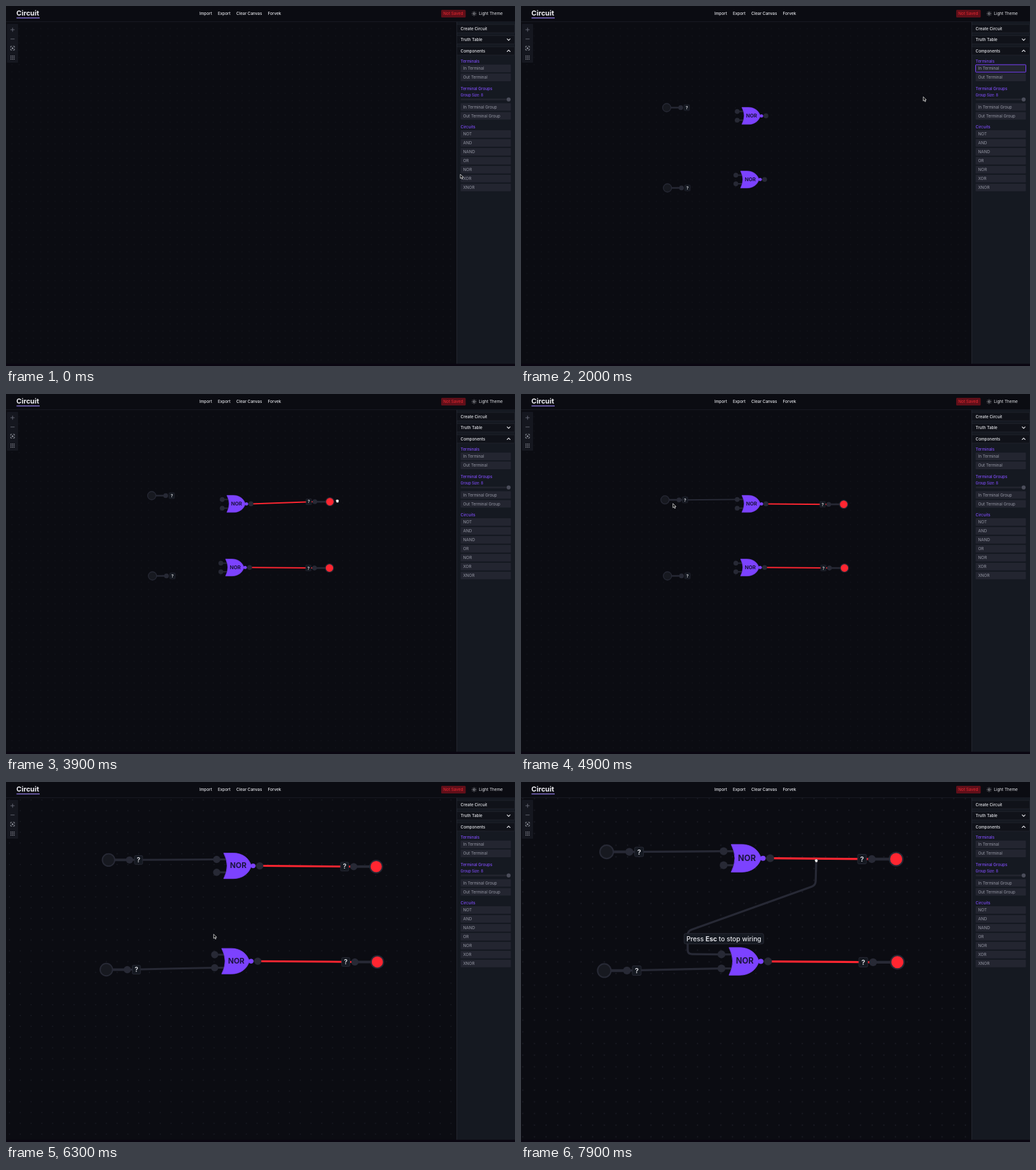
These frames come from a looping animation (800x565 px, 8 s). An HTML page:

```html
<!DOCTYPE html>
<html lang="en">
<head>
<meta charset="utf-8">
<title>Circuit</title>
<style>
  html, body { margin: 0; width: 100%; height: 100%; overflow: hidden; background: #0b0c12; }
  svg { display: block; width: 100vw; height: 100vh; font-family: Inter, "Liberation Sans", sans-serif; font-size: 6.35px; }
</style>
</head>
<body>
<svg viewBox="0 0 800 565" xmlns="http://www.w3.org/2000/svg">
  <defs>
    <pattern id="dots" x="-7.6" y="29.8" width="11.3" height="11.3" patternUnits="userSpaceOnUse">
      <circle cx="5.65" cy="5.65" r=".55" fill="#20212b"/>
    </pattern>
  </defs>
  <rect width="800" height="565" fill="#0b0c12"/>
  <g id="world">
    <rect x="-100" y="-100" width="1000" height="900" fill="url(#dots)"/>
    <g id="circuit"></g>
  </g>
  <g id="ui"></g>
  <g id="focus"></g>
  <g id="cursor"></g>
</svg>
<script>
const LOOP = 8000, STEP = 100;
const PURPLE = '#7c42ff', RED = '#ff2631', GREY = '#272935', PANEL = '#151921';
const WHITE = '#e6e7ec', EDGE = '#292b36';
const $ = id => document.getElementById(id);

// --- drawing helpers ---
const rect = (x, y, w, h, fill, extra = '') =>
  `<rect x="${x}" y="${y}" width="${w}" height="${h}" fill="${fill}" ${extra}/>`;
const circle = (x, y, r, fill, extra = '') =>
  `<circle cx="${x}" cy="${y}" r="${r}" fill="${fill}" ${extra}/>`;
const text = (x, y, s, fill, extra = '') =>
  `<text x="${x}" y="${y}" fill="${fill}" ${extra}>${s}</text>`;
const stroke = (d, color, width, extra = '') =>
  `<path d="${d}" fill="none" stroke="${color}" stroke-width="${width}" stroke-linecap="round" stroke-linejoin="round" ${extra}/>`;

// --- fixed interface ---
const ROW = 14;
const circuitRow = i => 200.9 + ROW * i;
const itemBox = cy => [714.5, cy - 5.9, 79, 11.8];
const item = (cy, label) => rect(...itemBox(cy), '#232530', 'rx="1"') + text(718.5, cy + 2.3, label, '#9698a5');
const heading = (y, label) => text(714.5, y, label, '#7d4bf4', 'font-weight="500"');
const sideRow = (i, label) =>
  rect(708.5, 29 + 17.5 * i, 91, 13, '#101219', 'stroke="#23252f" stroke-width=".7"') +
  text(714.5, 37.8 + 17.5 * i, label, WHITE, 'font-weight="500"');

function drawHeader() {
  let s = rect(0, 0, 800, 24.5, '#0b0c12') + rect(0, 24.3, 800, .8, '#1d1f28');
  s += text(16.3, 14.7, 'Circuit', '#f1f1f5', 'font-size="11" font-weight="700"');
  s += rect(16.5, 18, 36.5, 1.4, '#8470d2');
  s += text(304, 14.2, 'Import', WHITE, 'font-weight="500"') + text(333, 14.2, 'Export', WHITE, 'font-weight="500"');
  s += text(362, 14.2, 'Clear Canvas', WHITE, 'font-weight="500"') + text(411.5, 14.2, 'Forvek', WHITE, 'font-weight="500"');
  s += rect(684, 6, 38.5, 12, '#600f19', 'rx="1.5"') + text(687.3, 14.3, 'Not Saved', '#ea2831');
  s += circle(735.7, 12, 1.4, 'none', `stroke="${WHITE}" stroke-width=".7"`);
  for (let i = 0; i < 8; i++)
    s += stroke('M2.8 0h.7', WHITE, .5, `transform="translate(735.7 12) rotate(${i * 45})"`);
  return s + text(743.3, 14.2, 'Light Theme', WHITE);
}

function drawToolbar() {
  const dim = '#737582', bright = '#a0a2ad';
  let s = rect(1.5, 28, 17.5, 61, '#15171f', 'rx="1"');
  s += stroke('M7.5 37.2h5.6M10.3 34.4v5.6M7.5 51.8h5.6', dim, .8);
  s += stroke('M7.3 65v-1.8h1.8M11.5 63.2h1.8v1.8M13.3 67.4v1.8h-1.8M9.1 69.2h-1.8v-1.8', bright, .8);
  s += circle(10.3, 66.2, 1.2, bright);
  for (let i = 0; i < 9; i++) s += circle(7.8 + i % 3 * 2.5, 78.5 + (i / 3 | 0) * 2.5, .7, bright);
  return s;
}

function drawSidebar() {
  let s = rect(708.5, 25, 92, 538, PANEL) + rect(708, 25, .8, 538, EDGE);
  ['Create Circuit', 'Truth Table', 'Components'].forEach((label, i) => s += sideRow(i, label));
  s += stroke('M787.7 51.7l2.3 2.3 2.3-2.3M787.7 71.5l2.3-2.3 2.3 2.3', WHITE, 1.1);
  s += heading(89.2, 'Terminals') + item(98, 'In Terminal') + item(98 + ROW, 'Out Terminal');
  s += heading(132, 'Terminal Groups');
  s += text(714.5, 141.7, 'Group Size: 8', '#7d4bf4', 'font-size="5.5" font-weight="500"');
  s += rect(714.5, 145.3, 79, 2.8, '#22242e', 'rx="1.4"') + circle(790, 146.7, 3.1, '#4b4d5a');
  s += item(158.3, 'In Terminal Group') + item(158.3 + ROW, 'Out Terminal Group');
  s += heading(192.2, 'Circuits');
  ['NOT', 'AND', 'NAND', 'OR', 'NOR', 'XOR', 'XNOR'].forEach((name, i) => s += item(circuitRow(i), name));
  return s + rect(0, 561.5, 800, 3.5, '#0a0611');
}

// --- time helpers ---
const clamp = u => Math.min(1, Math.max(0, u));
const ease = u => u * u * (3 - 2 * u);
const progress = (t, a, b) => ease(clamp((t - a) / (b - a)));

// keys: [{ at, v: [numbers] }]
function track(keys, t) {
  const next = keys.findIndex(k => k.at > t);
  if (next < 1) return (next ? keys[keys.length - 1] : keys[0]).v;
  const a = keys[next - 1], b = keys[next], u = progress(t, a.at, b.at);
  return a.v.map((n, i) => n + (b.v[i] - n) * u);
}

// --- parts: where they are dropped, and how their pins sit ---
const PIN = 22.6, LEG = 6.8;
const makePart = (kind, x, y) => ({ kind, x, y, born: Infinity, lit: Infinity, move: null });
const norA = makePart('gate', 362.4, 172.4), norB = makePart('gate', 360.3, 272.3);
const inA = makePart('in', 229, 159.5), inB = makePart('in', 230.2, 285.5);
const outA = makePart('out', 510, 166.8), outB = makePart('out', 508.4, 273.1);
const PARTS = [norA, norB, inA, inB, outA, outB];

const KINDS = {
  gate: { row: circuitRow(4), corner: [-27, -14], pins: { a: [-PIN, -LEG], b: [-PIN, LEG], out: [PIN, 0] } },
  in: { row: 98, corner: [-9, -6.5], pins: { out: [22, 0] } },
  out: { row: 98 + ROW, corner: [-27, -7], pins: { a: [-23.6, 0] } }
};
const shift = ([x, y], [dx, dy]) => [x + dx, y + dy];
function position({ x, y, move }, t) {
  if (!move) return [x, y];
  const u = progress(t, move.grab, move.arrive);
  return [x + move.by[0] * u, y + move.by[1] * u];
}
const pinAt = (part, name, t) => shift(position(part, t), KINDS[part.kind].pins[name]);

// --- the story: one gesture after another, at an even pace ---
const stops = [{ at: 0, v: [714, 264] }], held = [], focus = [], links = [];
let clock = -80;

function gesture(pitch, from, to) {
  clock += pitch;
  const g = { grab: clock - 260, arrive: clock - 60, drop: clock };
  stops.push({ at: g.grab, v: from }, { at: g.arrive, v: to }, { at: g.drop, v: to });
  return g;
}
function place(part) {
  const { row, corner } = KINDS[part.kind];
  const g = gesture(480, [724, row], shift([part.x, part.y], corner));
  part.born = g.drop;
  held.push(g);
  focus.push({ at: g.grab, row });
}
function connect(a, b, side, color) {
  const g = gesture(400, pinAt(a, 'out', clock), pinAt(b, side, clock));
  links.push({ a, b, side, color, ...g });
  if (b.kind === 'out') b.lit = g.drop;
}
function nudge(part, by) {
  const grip = shift([part.x, part.y], [11.7, -1]);
  part.move = { by, ...gesture(400, grip, shift(grip, by)) };
  held.push(part.move);
}

PARTS.forEach(place);
clock += 80;
focus.push({ at: clock, row: 0 });
connect(norA, outA, 'a', RED);
connect(norB, outB, 'a', RED);
nudge(outA, [-2.8, 6.4]);
connect(inA, norA, 'a', GREY);
nudge(inA, [-2.7, 6.7]);
connect(inB, norB, 'b', GREY);
nudge(inB, [-6.2, -4.3]);

// zoom and offset
const VIEW = [
  { at: clock, v: [1, 0, 0] },
  { at: 6000, v: [1.375, -123.4, -93.5] },
  { at: 6600, v: [1.62, -232, -159.6] }
];
stops.push({ at: 6000, v: [332, 224] });
held.push({ grab: 5900, drop: 6200 });

// free wire with bends, one click every 200 ms
const WIRE_START = 7000, CLICK = 200;
const ROUTE = [[314, 271], [262, 270], [262, 234], [463, 162], [464, 123.5]];
stops.push({ at: WIRE_START - CLICK, v: ROUTE[0] });
ROUTE.forEach((v, i) => stops.push({ at: WIRE_START + CLICK * i, v }));
held.push({ grab: WIRE_START + CLICK * 4, drop: LOOP });

// --- circuit drawing ---
const pin = (x, y, hot) => hot(x, y)
  ? circle(x, y, 3.2, '#2a2350', `stroke="${PURPLE}" stroke-width="1.1"`)
  : circle(x, y, 3.8, GREY);

function drawGate(x, y, hot) {
  const body = 'M-15.3-13.4H-5C4.5-13.4 11.5-8 13.8 0C11.5 8 4.5 13.4-5 13.4H-15.3Q-8.2 0-15.3-13.4Z';
  return stroke(`M${x - PIN} ${y - LEG}h11M${x - PIN} ${y + LEG}h11M${x + 14} ${y}h8`, GREY, 2) +
    `<path transform="translate(${x} ${y})" d="${body}" fill="${PURPLE}" stroke="${PURPLE}" stroke-width=".5" stroke-linejoin="round"/>` +
    circle(x + 15.6, y, 2.5, PURPLE) +
    Object.values(KINDS.gate.pins).map(p => pin(...shift([x, y], p), hot)).join('') +
    text(x, y + 2.4, 'NOR', '#1c1440', 'font-size="7.9" font-weight="700" text-anchor="middle"');
}

function drawTerminal(x, y, kind, lit, tagged, hot) {
  const [pinDx] = Object.values(KINDS[kind].pins)[0];
  const tag = x + pinDx + Math.sign(pinDx) * 9.5;
  let s = stroke(`M${x} ${y}h${pinDx}`, GREY, 2.7) +
    circle(x, y, 6.5, lit ? RED : '#171920', `stroke="${GREY}" stroke-width="1.3"`) +
    pin(x + pinDx, y, hot);
  if (tagged)
    s += rect(tag - 4.3, y - 4.6, 8.6, 9.2, PANEL, `rx="1.2" stroke="${EDGE}" stroke-width=".6"`) +
      text(tag, y + 2.4, '?', WHITE, 'font-size="6.8" font-weight="600" text-anchor="middle"');
  return s;
}

function roundedPath(points, radius) {
  const toward = (p, q) => {
    const len = Math.hypot(q[0] - p[0], q[1] - p[1]) || 1, k = Math.min(radius, len / 2) / len;
    return [p[0] + (q[0] - p[0]) * k, p[1] + (q[1] - p[1]) * k];
  };
  const bends = points.slice(1, -1).map((p, i) => `L${toward(p, points[i])}Q${p} ${toward(p, points[i + 2])}`);
  return `M${points[0]}${bends.join('')}L${points[points.length - 1]}`;
}

function drawHint([x, y]) {
  return rect(x - 38.6, y - 5, 77.2, 10, PANEL, `rx="1.5" stroke="${EDGE}" stroke-width=".6"`) +
    text(x, y + 2.3, 'Press <tspan font-weight="700">Esc</tspan> to stop wiring', WHITE,
      'text-anchor="middle" font-size="6.35" font-weight="500"');
}

function drawCircuit(t, pointer, [zoom, ox, oy]) {
  const toWorld = ([x, y]) => [(x - ox) / zoom, (y - oy) / zoom];
  const mouse = toWorld(pointer), wiring = t > WIRE_START;
  const hot = (x, y) => !wiring && Math.hypot(mouse[0] - x, mouse[1] - y) < 3.5;
  let s = '';

  // a wire follows the pointer until it is attached
  for (const { a, b, side, color, grab, drop } of links) {
    if (t <= grab) continue;
    const end = t < drop ? mouse : pinAt(b, side, t);
    s += stroke(`M${pinAt(a, 'out', t)}L${end}`, t < drop ? GREY : color, 2);
  }
  const start = pinAt(norB, 'a', t);
  if (wiring) {
    const bends = ROUTE.slice(1, Math.ceil((t - WIRE_START) / CLICK)).map(toWorld);
    s += stroke(roundedPath([start, ...bends, mouse], 4), GREY, 2);
  }
  for (const part of PARTS) {
    if (t < part.born) continue;
    const at = position(part, t);
    s += part.kind === 'gate' ? drawGate(...at, hot)
      : drawTerminal(...at, part.kind, t >= part.lit, t > part.born, hot);
  }
  if (wiring) s += drawHint(shift(start, [2.3, -15.2]));
  $('circuit').innerHTML = s;
  $('world').setAttribute('transform', `translate(${ox} ${oy}) scale(${zoom})`);
}

function drawPointer(t, [x, y]) {
  const hand = '<path d="M-2.4-.6Q-2.6-2-1.4-1.8Q-1.2-2.8-.2-2.3Q.8-2.9 1.2-2Q2.5-2.1 2.4-.6Q2.5 1 1.5 2.5H-1.1Q-1.5 1.4-2.4-.6Z" fill="#f4f4f4" stroke="#111" stroke-width=".4"/>';
  const arrow = '<path d="M0 0V6.6L1.6 5.2L2.7 7.7L3.9 7.2L2.8 4.8H4.9Z" fill="#0a0a0a" stroke="#f2f2f2" stroke-width=".75"/>';
  $('cursor').innerHTML = held.some(h => t >= h.grab && t < h.drop) ? hand : arrow;
  $('cursor').setAttribute('transform', `translate(${x} ${y})`);
}

function drawFocus(t) {
  const row = focus.filter(f => f.at <= t).pop()?.row;
  $('focus').innerHTML = row ? rect(...itemBox(row), 'none', `rx="1" stroke="${PURPLE}"`) : '';
}

function render(t) {
  const pointer = track(stops, t);
  drawCircuit(t, pointer, track(VIEW, t));
  drawFocus(t);
  drawPointer(t, pointer);
}

$('ui').innerHTML = drawHeader() + drawToolbar() + drawSidebar();
const begin = performance.now();
function tick() {
  const t = (performance.now() - begin) % LOOP;
  render(Math.floor(t / STEP) * STEP);
  requestAnimationFrame(tick);
}
tick();
</script>
</body>
</html>
```
